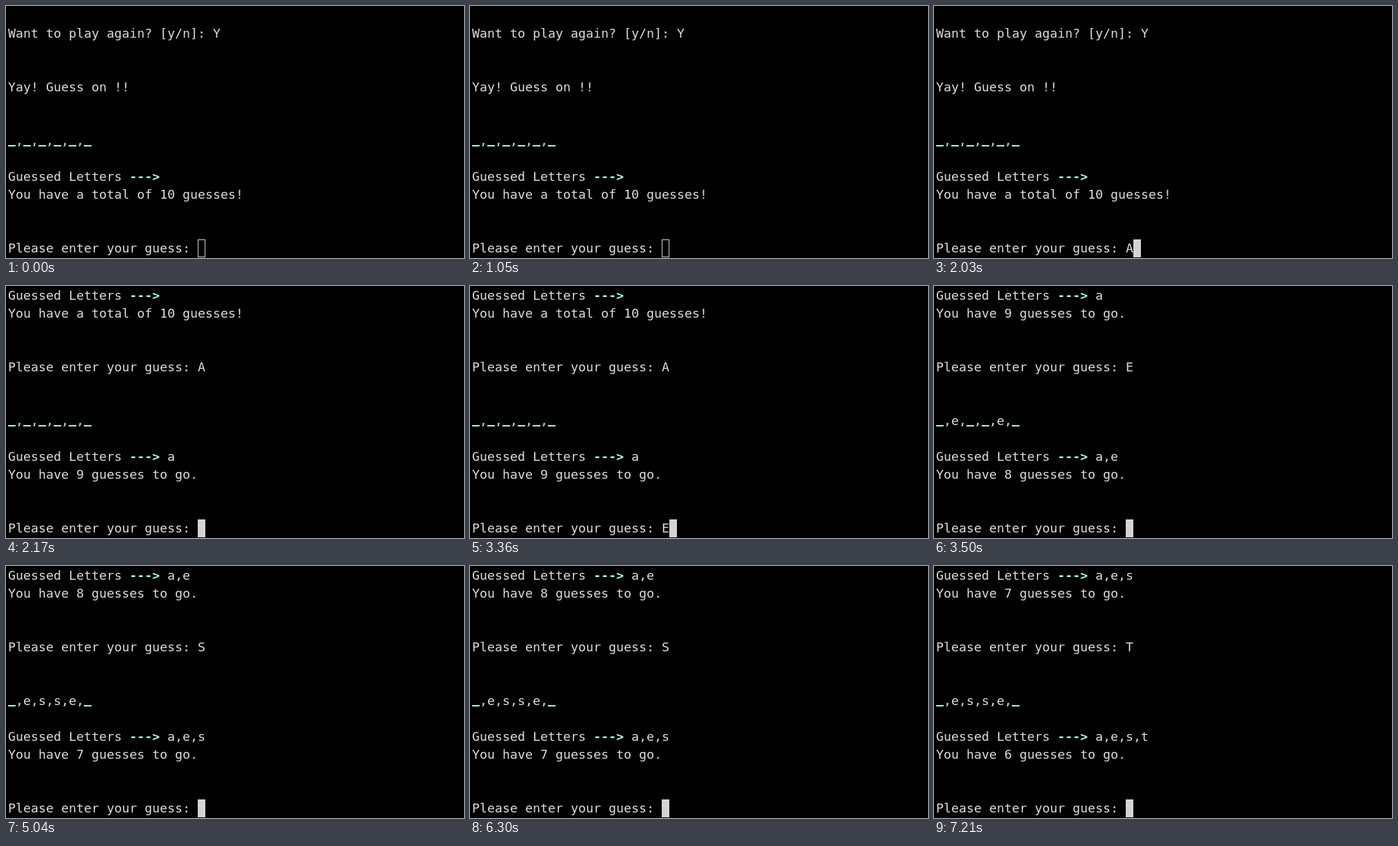
Animation, 664 px wide and 366 px high, one loop 8 s. Source, as an HTML page:

```html
<!DOCTYPE html>
<html lang="en">
<head>
<meta charset="utf-8">
<title>Word guessing game</title>
<style>
  html, body {
    margin: 0;
    width: 100%;
    height: 100%;
    overflow: hidden;
    background: #000;
  }
  #stage {
    position: relative;
    width: 664px;
    height: 366px;
    overflow: hidden;
    background: #000;
  }
  #log {
    position: absolute;
    left: 3px;
    top: 1px;
    margin: 0;
    color: #dcdcdc;
    font: 18.27px/26px "DejaVu Sans Mono", monospace;
    white-space: pre;
    animation: scroll 8s step-end infinite;
  }
  b { color: #a9f7df; }
  /* letter slots: a bar sitting on the baseline */
  i {
    display: inline-block;
    height: 26px;
    vertical-align: top;
    color: transparent;
    background: linear-gradient(#a9f7df, #a9f7df) 0 19px / 100% 2px no-repeat;
  }
  /* the cursor also hides the letter that is not typed yet */
  #cursor {
    position: absolute;
    left: 278px;
    top: 339px;
    width: 11px;
    height: 26px;
    box-sizing: border-box;
    border: 1px solid #d4d4d4;
    background: #d4d4d4;
    animation: cursor 8s step-end infinite;
  }
  @keyframes scroll {
    0% { transform: translateY(0); }
    26.25% { transform: translateY(-234px); }
    42.875% { transform: translateY(-468px); }
    56.875% { transform: translateY(-702px); }
    87.5%, 100% { transform: translateY(-936px); }
  }
  @keyframes cursor {
    0% { left: 278px; background: #000; }
    17.5% { left: 289px; background: #d4d4d4; }
    26.25% { left: 278px; background: #d4d4d4; }
    37.625% { left: 289px; background: #d4d4d4; }
    42.875% { left: 278px; background: #d4d4d4; }
    55.125% { left: 289px; background: #d4d4d4; }
    56.875% { left: 278px; background: #d4d4d4; }
    85.75% { left: 289px; background: #d4d4d4; }
    87.5%, 100% { left: 278px; background: #d4d4d4; }
  }
</style>
</head>
<body>
<div id="stage">
  <pre id="log"></pre>
  <div id="cursor"></div>
</div>
<script>
  const words = ["______", "______", "_e__e_", "_esse_", "_esse_"];
  const guesses = "AEST";

  const slots = word => [...word].map(c => c === "_" ? "<i>_</i>" : c).join(",");

  const round = (word, n) => {
    const used = [...guesses.slice(0, n).toLowerCase()].join(",");
    const left = n ? `${10 - n} guesses to go.` : "a total of 10 guesses!";
    return [
      slots(word), "",
      `Guessed Letters <b>---&gt;</b> ${used}`,
      `You have ${left}`, "", "",
      `Please enter your guess: ${guesses[n] || ""}`, "", ""
    ];
  };

  const intro = ["", "Want to play again? [y/n]: Y", "", "", "Yay! Guess on !!", "", ""];
  document.getElementById("log").innerHTML =
    "\n" .slice(1) + [...intro, ...words.flatMap(round)].join("\n");
</script>
</body>
</html>
```
